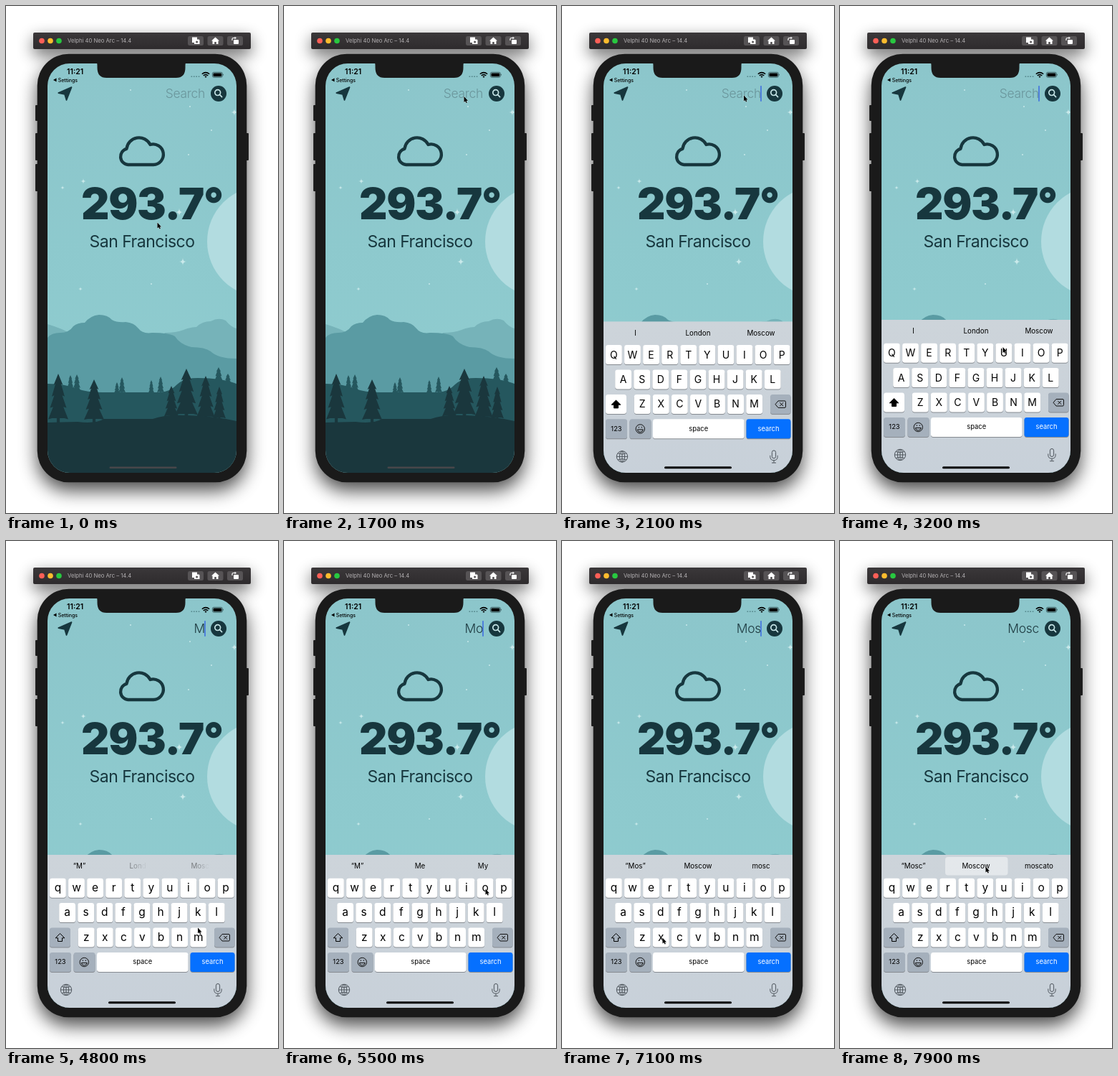
An HTML page for the animation above (8 s loop, 380x706 px).

```html
<!DOCTYPE html>
<html lang="en">
<head>
<meta charset="utf-8">
<title>Weather search</title>
<style>
html, body { margin: 0; width: 100%; height: 100%; overflow: hidden; background: #fff; }
svg { display: block; width: 380px; height: 706px; font-family: Inter, Roboto, sans-serif; }
text { white-space: pre; }
.mid { text-anchor: middle; }
.end { text-anchor: end; }
</style>
</head>
<body>
<svg viewBox="0 0 380 706">
  <defs>
    <filter id="soft" x="-30%" y="-30%" width="160%" height="160%"><feGaussianBlur stdDeviation="13"/></filter>
    <filter id="softBar" x="-30%" y="-300%" width="160%" height="700%"><feGaussianBlur stdDeviation="11"/></filter>
    <clipPath id="screen"><rect x="58" y="80" width="264" height="570" rx="31"/></clipPath>
    <linearGradient id="sky" x2="0" y2="1"><stop stop-color="#8cc6cb"/><stop offset="1" stop-color="#8fcdd0"/></linearGradient>
    <linearGradient id="panel" x2="0" y2="1"><stop stop-color="#cdd4da"/><stop offset="1" stop-color="#c7d0d9"/></linearGradient>
    <linearGradient id="bar" x2="0" y2="1"><stop stop-color="#3b383a"/><stop offset="1" stop-color="#2e2b2d"/></linearGradient>
  </defs>

  <rect x="38" y="45" width="304" height="23" rx="4" opacity=".6" filter="url(#softBar)"/>
  <rect x="44" y="79" width="292" height="596" rx="44" opacity=".7" filter="url(#soft)"/>

  <!-- window bar -->
  <rect x="38" y="37" width="304" height="23" rx="2" fill="url(#bar)"/>
  <circle cx="50" cy="48.5" r="3.8" fill="#fe5f57"/>
  <circle cx="62" cy="48.5" r="3.8" fill="#febc2e"/>
  <circle cx="74" cy="48.5" r="3.8" fill="#28c840"/>
  <text x="86" y="51.3" font-size="7.7" fill="#b4b1b3">Velphi 40 Neo Arc – 14.4</text>
  <g fill="#565355">
    <rect x="254" y="42" width="22" height="13" rx="2.5"/>
    <rect x="281.5" y="42" width="22" height="13" rx="2.5"/>
    <rect x="309" y="42" width="22" height="13" rx="2.5"/>
  </g>
  <g fill="#fff">
    <path d="M260 43.5h7v3h2.500l1 1v5.500h-7.500v-2h-3z"/>
    <circle cx="266.600" cy="50" r="1.500" fill="#565355"/>
    <path d="M292.500 43.500l5.500 5h-1.500v4.500h-2.700v-3h-2.600v3h-2.700v-4.500h-1.500z"/>
    <rect x="318" y="47" width="7" height="6" rx="1"/>
    <path d="M316 48v-2q0-1.500 1.500-1.500h2.500" fill="none" stroke="#fff" stroke-width="1.200"/>
    <path d="M319.500 42.700l2.500 1.800-2.500 1.800z"/>
  </g>

  <!-- phone body -->
  <g fill="#1d1d1d">
    <rect x="41" y="138" width="5" height="22" rx="1"/>
    <rect x="41" y="177" width="5" height="38" rx="1"/>
    <rect x="41" y="220" width="5" height="38" rx="1"/>
    <rect x="334" y="177" width="5" height="38" rx="1"/>
  </g>
  <rect x="43.700" y="66.700" width="292.600" height="596.600" rx="44" fill="#1a1a1a"/>

  <g clip-path="url(#screen)">
    <rect x="58" y="80" width="264" height="570" fill="url(#sky)"/>
    <circle cx="358" cy="328" r="77" fill="#b2dce0"/>
    <g id="stars" fill="#c9e9ea"></g>
    <path fill="#76b3b9" d="M58 443Q68 446 78 450L120 470H210L222 455Q238 455 248 451T266 447Q274 439 286 439Q297 433 307 438Q314 447 322 449V540H58Z"/>
    <path fill="#5a9ba3" d="M58 462Q63 455 76 455Q88 455 94 446Q100 441 110 441Q118 431 130 430Q142 430 148 437Q155 441 167 440Q179 441 185 449Q191 457 204 455Q228 455 236 460Q243 471 259 475Q278 475 286 481Q296 491 322 491V560H58Z"/>
    <g id="farTrees" fill="#25575e"></g>
    <path fill="#25575e" d="M58 526Q82 526 100 533Q112 538 135 538H215Q230 537 239 527Q248 518 268 518Q302 518 322 526V600H58Z"/>
    <g id="nearTrees" fill="#1a373d"></g>
    <path fill="#1a373d" d="M58 580L100 579Q125 582 137 575H205Q222 569 250 570Q290 571 322 578V650H58Z"/>
    <rect id="home" x="144.500" y="641.500" width="94" height="2.600" rx="1.300" fill="#48474a"/>

    <path d="M82 78H125q2.500 0 2.500 5v3q0 14 13 14h97q13 0 13-14v-3q0-5 2.500-5H262V70H82Z" fill="#1a1a1a"/>
    <text x="85" y="95" font-size="10.500" font-weight="600">11:21</text>
    <path d="M66 103l4.500-2.500v5z"/>
    <text x="72.700" y="105.600" font-size="7" font-weight="500">Settings</text>
    <path d="M258.500 98.200h12" stroke="#55868b" stroke-width="1.600" stroke-dasharray="1.700 1.700"/>
    <path d="M273.800 94.800q5.200-4.400 10.400 0M275.700 97q3.300-2.800 6.600 0" fill="none" stroke="#000" stroke-width="1.500"/>
    <path d="M277.500 98.200q1.500-1.200 3 0l-1.500 1.700z"/>
    <rect x="288.400" y="92.300" width="14" height="7" rx="2" fill="none" stroke="#2d4c50" stroke-width=".8"/>
    <rect x="289.500" y="93.400" width="11.800" height="4.800" rx="1"/>
    <path d="M303.300 94.500q1.200 1.300 0 2.600z"/>

    <g fill="#17373e">
      <path d="M91.500 113.200L84.500 131L82 122.800L73.300 121Z" stroke="#17373e" stroke-width="1.800" stroke-linejoin="round"/>
      <circle cx="297" cy="122" r="11"/>
      <text x="204" y="297.300" class="mid" font-size="61" font-weight="900" letter-spacing="-1.200">293.7°</text>
      <text x="190" y="335.700" class="mid" font-size="23" letter-spacing="-.5">San Francisco</text>
    </g>
    <g fill="none" stroke-linecap="round">
      <path d="M298.700 123.600L301.600 126.600M299.600 120.600a3.900 3.900 0 1 1-7.800 0a3.900 3.900 0 1 1 7.800 0" stroke="#c5e3e5" stroke-width="1.700"/>
      <path d="M170.500 221A11.300 11.300 0 0 1 168.500 198.800A17.500 17.500 0 0 1 201.500 193A14.300 14.300 0 1 1 206 221Z" stroke="#17373e" stroke-width="4.300" stroke-linejoin="round"/>
    </g>
    <text id="query" class="end" x="278" y="128.300" font-size="17.500" font-weight="300" letter-spacing="-.3"></text>
    <rect id="caret" x="277.200" y="111" width="1.600" height="22" rx=".8" fill="#3f6ee0"/>

    <g id="board">
      <rect x="58" y="437" width="264" height="240" fill="url(#panel)"/>
      <rect id="pick" x="147" y="440" width="87.500" height="25.500" rx="4" fill="#fff" opacity=".45"/>
      <g id="words" class="mid" font-size="9.800"></g>
      <g id="keys" class="mid"></g>
      <g fill="none" stroke="#4f565d" stroke-width="1">
        <circle cx="84" cy="625" r="7.700"/>
        <ellipse cx="84" cy="625" rx="3.600" ry="7.700"/>
        <path d="M76.300 625h15.400M84 617.300v15.400M78 620.500q6 2.500 12 0M78 629.500q6-2.500 12 0"/>
        <rect x="293.400" y="616.500" width="5.200" height="11" rx="2.600"/>
        <path d="M290.800 623.500v1.500q0 5.300 5.200 5.300t5.200-5.300v-1.500M296 630.300v3.200M293 633.700h6"/>
      </g>
      <g id="pop" class="mid">
        <path fill="#fff" stroke="#b4bac0" stroke-width=".6" d="M-16-34H16Q21-34 21-29V-12C21-4 11.500-4 11.500 4V24Q11.500 27 8.500 27H-8.500Q-11.500 27-11.500 24V4C-11.500-4-21-4-21-12V-29Q-21-34-16-34Z"/>
        <text y="-10" font-size="22"></text>
      </g>
    </g>
    <rect id="homeDark" x="143" y="641.300" width="94" height="3" rx="1.500"/>
  </g>
  <path id="cursor" d="M.5.5V8.600L2.300 7L3.500 9.500L4.900 8.900L3.700 6.400H6Z" stroke="#fff" stroke-width=".5" stroke-linejoin="round" paint-order="stroke"/>
</svg>

<script>
const LOOP = 8000, FOCUS = 1745;
const $ = id => document.getElementById(id);
const clamp = v => Math.max(0, Math.min(1, v));
const ease = u => u * u * (3 - 2 * u);

function add(parent, tag, attrs = {}, text = '') {
  const e = document.createElementNS('http://www.w3.org/2000/svg', tag);
  for (const k in attrs) e.setAttribute(k, attrs[k]);
  e.textContent = text;
  return parent.appendChild(e);
}

// scenery
function tree(parent, x, top, base, half) {
  const h = base - top, right = [], left = [];
  for (let i = 1; i <= 4; i++) {
    const y = top + h * i * .23, w = half * (.28 + .18 * i);
    right.push([x + w, y], [x + w * .62, y - h * .02]);
    left.unshift([x - w * .62, y - h * .02], [x - w, y]);
  }
  const trunk = [[x + half * .15, base - h * .1], [x + half * .15, base + 3], [x - half * .15, base + 3], [x - half * .15, base - h * .1]];
  add(parent, 'polygon', { points: [[x, top], ...right, ...trunk, ...left].join(' ') });
}
[[73, 512, 581, 14], [123, 520, 581, 14], [231, 529, 575, 10], [252, 505, 575, 16], [279, 515, 578, 13], [298, 530, 578, 9]]
  .forEach(a => tree($('nearTrees'), ...a));
[[90, 514, 538, 5], [99, 513, 540, 6], [155, 524, 540, 4], [162, 517, 540, 5], [203, 521, 540, 4], [216, 516, 540, 5], [297, 503, 530, 7], [310, 512, 532, 6]]
  .forEach(a => tree($('farTrees'), ...a));

[[108, 244, 4], [247, 356, 5.5], [319, 148, 5], [242, 287, 5.5], [104, 394, 3], [79, 253, 3]].forEach(([x, y, r]) =>
  add($('stars'), 'path', { d: `M${x} ${y - r}Q${x} ${y} ${x + r} ${y}Q${x} ${y} ${x} ${y + r}Q${x} ${y} ${x - r} ${y}Q${x} ${y} ${x} ${y - r}Z` }));
[[174, 117], [287, 173], [255, 207], [203, 387], [257, 140]].forEach(([x, y]) =>
  add($('stars'), 'circle', { cx: x, cy: y, r: 1 }));

// keyboard
const GREY = '#a5b0bc', keys = $('keys'), letters = [], spots = {};
function key(x, y, w, fill = '#fff') {
  add(keys, 'rect', { x, y: y + 1, width: w, height: 27, rx: 3.4, fill: '#868b91' });
  return add(keys, 'rect', { x, y, width: w, height: 27, rx: 3.4, fill });
}
['QWERTYUIOP', 'ASDFGHJKL', 'ZXCVBNM'].forEach((row, r) => {
  [...row].forEach((ch, i) => {
    const x = [72.4, 85.6, 112.2][r] + 26.08 * i, y = 469.7 + 34.4 * r;
    key(x - 11.4, y, 22.8);
    letters.push([add(keys, 'text', { x }), ch, y]);
    spots[ch] = [x, y];
  });
});
const shiftKey = key(61, 538.5, 29, '#fff');
const shiftIcon = add(keys, 'path', { d: 'M75.500 546.500l6.300 6.300h-3.300v4.700h-6v-4.700h-3.300z', stroke: '#000', 'stroke-linejoin': 'round' });
key(291, 538.5, 28.5, GREY);
add(keys, 'path', { d: 'M302 547.500h9q1.500 0 1.500 1.500v6.500q0 1.500-1.500 1.500h-9l-4-4.750zM304.300 549.900l4.700 4.700M309 549.900l-4.700 4.700', fill: 'none', stroke: '#111', 'stroke-linejoin': 'round' });
const bottom = [[61, 30, GREY, '123'], [94.5, 30, GREY, ''], [127, 127.5, '#fff', 'space'], [257.5, 62, '#0570ff', 'search']];
bottom.forEach(([x, w, fill, label]) => {
  key(x, 572.9, w, fill);
  add(keys, 'text', { x: x + w / 2, y: 589.3, 'font-size': 9.4, fill: label === 'search' ? '#fff' : '#000' }, label);
});
add(keys, 'path', { d: 'M115.500 586.500a6.200 6.200 0 1 1-12.400 0a6.200 6.200 0 1 1 12.400 0M105.300 587.500h8q-.5 3.500-4 3.500t-4-3.500zM107.300 583.500v1.500M111.300 583.500v1.500', fill: 'none', stroke: '#111' });

let upper;
function setCase(up) {
  if (up === upper) return;
  upper = up;
  for (const [t, ch, y] of letters) {
    t.textContent = up ? ch : ch.toLowerCase();
    t.setAttribute('font-size', up ? 14 : 15.5);
    t.setAttribute('y', y + (up ? 18.6 : 18));
  }
  shiftKey.setAttribute('fill', up ? '#fff' : GREY);
  shiftIcon.setAttribute('fill', up ? '#000' : 'none');
}

// typing: time, query, three suggestions
const STATES = [
  [0, '', 'I', 'London', 'Moscow'],
  [4600, 'M', '“M”', 'Me', 'My'],
  [5500, 'Mo', '“Mo”', 'Mom', 'More'],
  [6100, 'Mos', '“Mos”', 'Moscow', 'mosc'],
  [7250, 'Mosc', '“Mosc”', 'Moscow', 'moscato']
];
const PRESSES = [[4400, 4600, 'M'], [5400, 5500, 'O'], [6000, 6100, 'S'], [7150, 7250, 'C']];

// pointer: time, x, y
const PATH = [
  [0, 211, 301], [300, 211, 301], [1300, 251, 126], [1700, 251, 125.5], [2100, 253.5, 124],
  [2400, 253.5, 124], [3200, 227, 474.5], [3700, 240, 556], [4200, 269, 546], [4600, 269, 546],
  [4800, 267.5, 538], [5300, 281, 484], [5500, 281, 484], [5950, 113, 518], [6100, 113, 518],
  [6300, 124, 535], [6700, 140, 552], [7300, 140, 552], [7750, 203, 453], [LOOP, 203, 453]
];

const slots = [102.5, 190, 278].map(x => {
  const t = add($('words'), 'text', { x, y: 456.4 });
  return { x, t, parts: Array.from({ length: 8 }, () => add(t, 'tspan')) };
});

function drawSlot(i, n, age) {
  const { x, t, parts } = slots[i];
  const word = STATES[n][i + 2], prev = n ? STATES[n - 1][i + 2] : word;
  const same = word === prev, slow = n === 1 && i > 0;
  const outTime = slow ? 345 : 60;
  const old = !same && age < outTime, shown = old ? prev : word;
  const alpha = k => {
    if (same) return 1;
    if (old) return clamp(1 - age * (slow ? .0029 + .0006 * k : 1 / outTime));
    if (!i) return clamp((age - 60) / 80);
    const order = i === 1 ? shown.length - 1 - k : k;
    return clamp((age - (slow ? 345 : i === 1 ? 85 : 105) - order * 25) / 40);
  };
  parts.forEach((p, k) => {
    p.textContent = shown[k] || '';
    p.setAttribute('fill-opacity', alpha(k));
  });
  const drift = i === 1 && n === 3 ? 4 * (1 - clamp((age - 200) / 150)) : 0;
  t.setAttribute('x', x - drift);
}

function draw(t) {
  const i = Math.max(1, PATH.findIndex(p => p[0] > t));
  const [t0, x0, y0] = PATH[i - 1], [t1, x1, y1] = PATH[i];
  const u = ease((t - t0) / (t1 - t0));
  $('cursor').setAttribute('transform', `translate(${x0 + (x1 - x0) * u} ${y0 + (y1 - y0) * u})`);

  // critically damped rise
  const open = t >= FOCUS, w = Math.max(0, t - FOCUS) * .01826;
  $('board').style.display = open ? '' : 'none';
  $('board').setAttribute('transform', `translate(0 ${213 * (1 + w) * Math.exp(-w)})`);
  $('homeDark').style.opacity = clamp((t - FOCUS) / 150);

  const n = STATES.filter(s => s[0] <= t).length - 1, [since, typed] = STATES[n];
  setCase(n === 0);
  $('query').textContent = typed || 'Search';
  $('query').setAttribute('fill', typed ? '#1d3a40' : '#6a959b');
  slots.forEach((_, k) => drawSlot(k, n, t - since));

  const blink = (t - (n ? since : FOCUS + 55)) % 1000;
  $('caret').style.opacity = open ? clamp(blink < 750 ? (600 - blink) / 100 : (blink - 900) / 100) : 0;
  $('pick').style.display = t >= 7800 ? '' : 'none';

  const press = PRESSES.find(p => t >= p[0] && t < p[1]);
  $('pop').style.display = press ? '' : 'none';
  if (press) {
    const ch = press[2];
    $('pop').setAttribute('transform', `translate(${spots[ch]})`);
    $('pop').lastElementChild.textContent = upper ? ch : ch.toLowerCase();
  }
}

const start = performance.now();
function tick() {
  draw((performance.now() - start) % LOOP);
  requestAnimationFrame(tick);
}
tick();
</script>
</body>
</html>
```
